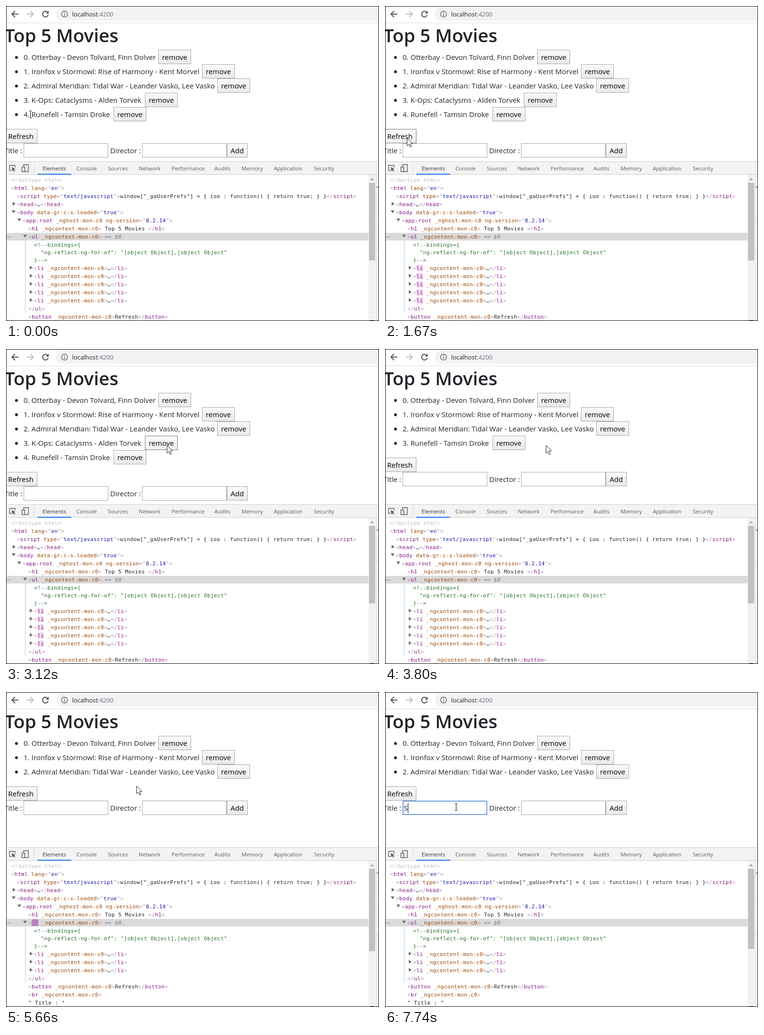
An HTML page with a canvas for the animation above (7990 ms loop, 784 by 661 pixels).

```html
<!DOCTYPE html>
<html lang="en">
<head>
<meta charset="utf-8">
<title>Movie list</title>
<style>
  html, body { margin: 0; width: 100%; height: 100%; overflow: hidden; background: #fff; }
  canvas { display: block; }
</style>
</head>
<body>
<canvas id="stage" width="784" height="661"></canvas>
<script>
const ctx = document.getElementById('stage').getContext('2d');
const LOOP = 7990;
const SANS = '"Open Sans", "Noto Sans", sans-serif';
const MONO = '11px "DejaVu Sans Mono", monospace';
const CELL = 7; // column width of the code tree
const INK = '#212529';
const PUNCT = '#a894a6', TAG = '#881280', ATTR = '#994500', VALUE = '#1a1aa6', COMMENT = '#236e25';

const movies = [
  { text: 'Otterbay - Devon Tolvard, Finn Dolver', x: 320 },
  { text: 'Ironfox v Stormowl: Rise of Harmony - Kent Morvel', x: 412 },
  { text: 'Admiral Meridian: Tidal War - Leander Vasko, Lee Vasko', x: 444 },
  { text: 'K-Ops: Cataclysms - Alden Torvek', x: 292, removed: 3770 },
  { text: 'Runefell - Tamsin Droke', x: 226, removed: 5310 },
];
const presses = [[750, 870], [1830, 1990], [3610, 3770], [5150, 5310]];
// Each DOM update flashes the ul tag and the li tags from index "first" on.
const flashes = [
  { at: 870, first: 0 }, { at: 2045, first: 0 }, { at: 3930, first: 3 }, { at: 5465, first: 9 },
];
const cursorPath = [ // time, x, y
  [20, 51, 227], [400, 46, 277], [2270, 46, 277], [2600, 265, 236], [2960, 338, 202],
  [4530, 338, 202], [4690, 306, 202], [4900, 274, 197], [6270, 274, 197], [6620, 149, 241],
];
const FOCUS = 6770, BLINK = 7300, TYPED = 7660;

const mix = (a, b, k) => a + (b - a) * k;
const mixRgb = (a, b, k) => a.map((v, i) => Math.round(mix(v, b[i], k)));

function box(x, y, w, h, color) {
  ctx.fillStyle = color;
  ctx.fillRect(x, y, w, h);
}

function text(str, x, y, size, color = INK, weight = 400) {
  ctx.font = `${weight} ${size}px ${SANS}`;
  ctx.fillStyle = color;
  ctx.fillText(str, x, y);
}

function path(d, x, y, stroke, width = 1, fill) {
  ctx.save();
  ctx.translate(x, y);
  const p = new Path2D(d);
  if (fill) { ctx.fillStyle = fill; ctx.fill(p); }
  if (stroke) { ctx.strokeStyle = stroke; ctx.lineWidth = width; ctx.stroke(p); }
  ctx.restore();
}

function cursorAt(t) {
  const next = cursorPath.findIndex(p => p[0] > t);
  if (next === 0) return cursorPath[0].slice(1);
  if (next < 0) return cursorPath[cursorPath.length - 1].slice(1);
  const a = cursorPath[next - 1], b = cursorPath[next];
  const k = (t - a[0]) / (b[0] - a[0]);
  return [mix(a[1], b[1], k), mix(a[2], b[2], k)];
}

function button(label, x, y, w, textX, mouse) {
  const hover = mouse.x >= x && mouse.x < x + w && mouse.y >= y && mouse.y < y + 30;
  const down = hover && mouse.down;
  const shade = ctx.createLinearGradient(0, y, 0, y + 30);
  shade.addColorStop(0, down ? '#e6e6e6' : '#fafafa');
  shade.addColorStop(1, down ? '#f4f4f4' : hover ? '#efefef' : '#eaeaea');
  box(x, y, w, 30, shade);
  ctx.strokeStyle = hover ? '#777' : '#a6a6a6';
  ctx.lineWidth = 1;
  ctx.strokeRect(x + .5, y + .5, w - 1, 29);
  text(label, textX, y + 21, 15, '#000');
}

function input(x, y, focused) {
  box(x, y, 178, 30, '#fff');
  ctx.lineWidth = focused ? 2 : 1;
  ctx.strokeStyle = focused ? '#6a9ce0' : '#a6a6a6';
  const inset = focused ? 1 : .5;
  ctx.strokeRect(x + inset, y + inset, 178 - 2 * inset, 30 - 2 * inset);
}

function drawToolbar() {
  box(0, 35, 784, 1, '#dcdcdc');
  ctx.fillStyle = '#f1f3f4';
  ctx.beginPath();
  ctx.roundRect(105, 4, 700, 27, 13.5);
  ctx.fill();
  path('M7 0H-6M0 -6.5L-6.5 0L0 6.5', 19, 17, '#50545a', 2);
  path('M-7 0H6M0 -6.5L6.5 0L0 6.5', 51, 17, '#b9bcc0', 2);
  path('M5 -3.3A6 6 0 1 0 5.8 1.6', 83, 17, '#50545a', 2);
  path('M6.8 -7V-1H.8Z', 83, 17, null, 0, '#50545a');
  path('M6.3 0A6.3 6.3 0 1 1 -6.3 0A6.3 6.3 0 1 1 6.3 0M0 -1V4M0 -4V-2.4', 123, 17, '#5f6368', 1.4);
  text('localhost', 139, 22, 12.9, '#202124');
  text(':4200', 193, 22, 12.9, '#6b6f74');
}

function drawPage(t, mouse) {
  text('Top 5 Movies', -3, 76, 38.5, INK, 600);
  const shown = movies.filter(m => !(t >= m.removed));
  shown.forEach((m, i) => {
    const y = 92 + 30 * i;
    ctx.fillStyle = INK;
    ctx.beginPath();
    ctx.arc(22, y + 16, 3, 0, 7);
    ctx.fill();
    text(`${i}. ${m.text}`, 37, y + 21, 15);
    button('remove', m.x, y, 69, m.x + 8, mouse);
  });
  const y = 108 + 30 * shown.length;
  button('Refresh', -4, y, 70, 4.5, mouse);
  text('Title :', -3.5, y + 51, 15);
  input(37, y + 30, t >= FOCUS);
  text('Director :', 219, y + 51, 15);
  input(286, y + 30, false);
  button('Add', 464, y + 30, 44, 472, mouse);
  if (t >= TYPED) text('S', 39.5, y + 51, 15);
  if (t >= FOCUS && t < BLINK) box(39, y + 35, 1, 21, '#000');
  if (t >= TYPED) box(48, y + 35, 1, 21, '#000');
}

function drawTabs() {
  box(0, 326, 784, 28, '#f3f3f3');
  box(0, 326, 784, 1, '#cdcdcd');
  box(0, 353, 784, 1, '#cdcdcd');
  path('M5 5H.5V-5.5H12V-1', 7, 340, '#5a5a5a', 1.3);
  path('M5 -2L13 2L9.6 3.2L12.6 6.4L11.2 7.6L8.2 4.4L6.6 7Z', 7, 340, null, 0, '#5a5a5a');
  path('M4 -3V-7H14V7.5H7M.5 -2H6.5V7.5H.5Z', 33, 340, '#5a5a5a', 1.4);
  box(59, 333, 1, 15, '#ccc');
  const tabs = { Elements: 77, Console: 148, Sources: 214, Network: 279, Performance: 348,
    Audits: 438, Memory: 495, Application: 563, Security: 647 };
  for (const [name, x] of Object.entries(tabs))
    text(name, x, 345, 11.5, name === 'Elements' ? '#333' : '#5a5a5a');
  box(66, 352, 71, 2, '#1a73e8');
}

// Splits one line of markup into [text, colour] pieces.
function tokenize(line) {
  const out = [];
  for (const part of line.match(/<[^>]*>|[^<]+/g)) {
    const tag = part.match(/^(<\/?)([\w-]+)(.*)>$/);
    if (!tag) { out.push([part, '#222']); continue; }
    out.push([tag[1], PUNCT], [tag[2], TAG]);
    let quoted = false;
    for (const piece of tag[3].split(/(="|")/)) {
      if (piece.endsWith('"')) {
        quoted = !quoted;
        out.push([piece, PUNCT]);
      } else out.push([piece, quoted ? VALUE : ATTR]);
    }
    out.push(['>', PUNCT]);
  }
  return out;
}

function treeLines(count) {
  const scope = ' _ngcontent-mon-c0';
  return [
    { x: 11, s: '<!doctype html>', color: '#c0c0c0' },
    { x: 11, s: '<html lang="en">' },
    { x: 23, s: '<script type="text/javascript">window["_gaUserPrefs"] = { ioo : function() { return true; } }<\/script>' },
    { x: 23, s: '<head>…</head>', fold: 'closed' },
    { x: 23, s: '<body data-gr-c-s-loaded="true">', fold: 'open' },
    { x: 35, s: '<app-root _nghost-mon-c0 ng-version="8.2.14">', fold: 'open' },
    { x: 47, s: `<h1${scope}> Top 5 Movies </h1>` },
    { x: 47, s: `<ul${scope}>`, fold: 'open', item: -1 },
    { x: 59, s: '<!--bindings={', color: COMMENT },
    { x: 73, s: '"ng-reflect-ng-for-of": "[object Object],[object Object"', color: COMMENT },
    { x: 59, s: '}-->', color: COMMENT },
    ...Array.from({ length: count }, (_, i) => (
      { x: 59, s: `<li${scope}>…</li>`, fold: 'closed', item: i })),
    { x: 47, s: '</ul>' },
    { x: 47, s: `<button${scope}>Refresh</button>` },
    { x: 47, s: `<br${scope}>` },
    { x: 47, s: '" Title : "' },
  ].slice(0, 18);
}

// Highlight of a changed tag: strong purple, easing to pale pink, then gone.
function flashStyle(t, item) {
  const flash = flashes.filter(f => t >= f.at && (item < 0 || item >= f.first)).pop();
  if (!flash) return null;
  const age = t - flash.at;
  if (age > 1400) return null;
  const k = 1 - (1 - Math.min(1, age / 1120)) ** 3;
  const pale = item < 0 ? [218, 218, 218] : [245, 219, 244];
  const alpha = Math.min(1, (1400 - age) / 280);
  return {
    back: `rgba(${mixRgb([158, 54, 153], pale, k)},${alpha})`,
    ink: `rgb(${mixRgb([255, 255, 255], [136, 18, 128], k)})`,
  };
}

function drawTree(t) {
  const count = t < 3930 ? 5 : t < 5465 ? 4 : 3;
  box(1, 476, 761, 16, '#dadada');
  box(40, 492, 1, 66 + 17 * count, '#a8c7f7');
  for (const x of [2.5, 5.5, 8.5]) box(x, 484, 1.5, 1.5, '#6e6e6e');

  ctx.save();
  ctx.font = MONO;
  ctx.letterSpacing = `${CELL - ctx.measureText('0').width}px`;
  treeLines(count).forEach((line, i) => {
    const y = 365 + 17 * i - (i > 8) - (i > 9);
    if (line.fold === 'open') path('M-4 -3H4L0 3Z', line.x - 7, y - 1, null, 0, '#6e6e6e');
    if (line.fold === 'closed') path('M-3 -4V4L3 0Z', line.x - 6, y - 1, null, 0, '#6e6e6e');

    const flash = line.item === undefined ? null : flashStyle(t, line.item);
    if (flash) {
      ctx.fillStyle = flash.back;
      ctx.beginPath();
      ctx.roundRect(line.x + 7, y - 7, 14, 14, 2);
      ctx.fill();
    }
    let x = line.x, first = true;
    ctx.font = MONO;
    for (const [str, color] of line.color ? [[line.s, line.color]] : tokenize(line.s)) {
      const lit = flash && color === TAG && first;
      if (color === TAG) first = false;
      ctx.fillStyle = lit ? flash.ink : color;
      ctx.fillText(str, x, y + 4);
      x += CELL * str.length;
    }
    if (line.item === -1) {
      ctx.fillStyle = '#777';
      ctx.fillText('==', 208, y + 4);
      ctx.font = 'italic ' + MONO;
      ctx.fillText('$0', 229, y + 4);
    }
  });
  ctx.restore();

  const thumbEnd = t < 3930 ? 534 : t >= 5465 && t < TYPED ? 544 : 539;
  box(762, 354, 15, 306, '#f1f1f1');
  box(763, 371, 13, thumbEnd - 371, '#c1c1c1');
  path('M-4 2.5L0 -2L4 2.5Z', 769.5, 363, null, 0, '#a3a3a3');
  box(766, 659, 8, 1, '#777');
  box(777, 354, 6, 306, '#fff');
  box(778, 354, 1, 306, '#d0d0d0');
  box(779, 379, 4, 2, '#5b95ea');
  for (const y of [444, 510, 557]) box(779, y, 4, 1, '#ccc');
}

function drawCursor({ x, y }, t) {
  const overText = y < 238 && x < 60;
  const overInput = t > 6270 && y >= 228 && x < 215;
  if (overText || overInput)
    path('M-3 -7.5H-1L0 -6.5L1 -7.5H3M0 -6.5V6.5M-3 7.5H-1L0 6.5L1 7.5H3', Math.round(x) + .5, Math.round(y) + .5, '#000', 1);
  else
    path('M0 0V16L3.8 12.4L6.6 18.8L9.2 17.7L6.4 11.4H11.6Z', Math.round(x) + .5, Math.round(y) + .5, '#222', 1, '#fff');
}

function draw() {
  const t = performance.now() % LOOP;
  const [x, y] = cursorAt(t);
  const mouse = { x, y, down: presses.some(([from, to]) => t >= from && t < to) };
  box(0, 0, 784, 661, '#fff');
  drawToolbar();
  drawPage(t, mouse);
  drawTabs();
  drawTree(t);
  drawCursor(mouse, t);
  ctx.strokeStyle = '#000';
  ctx.lineWidth = 1;
  ctx.strokeRect(.5, .5, 783, 660);
  requestAnimationFrame(draw);
}
draw();
</script>
</body>
</html>
```
